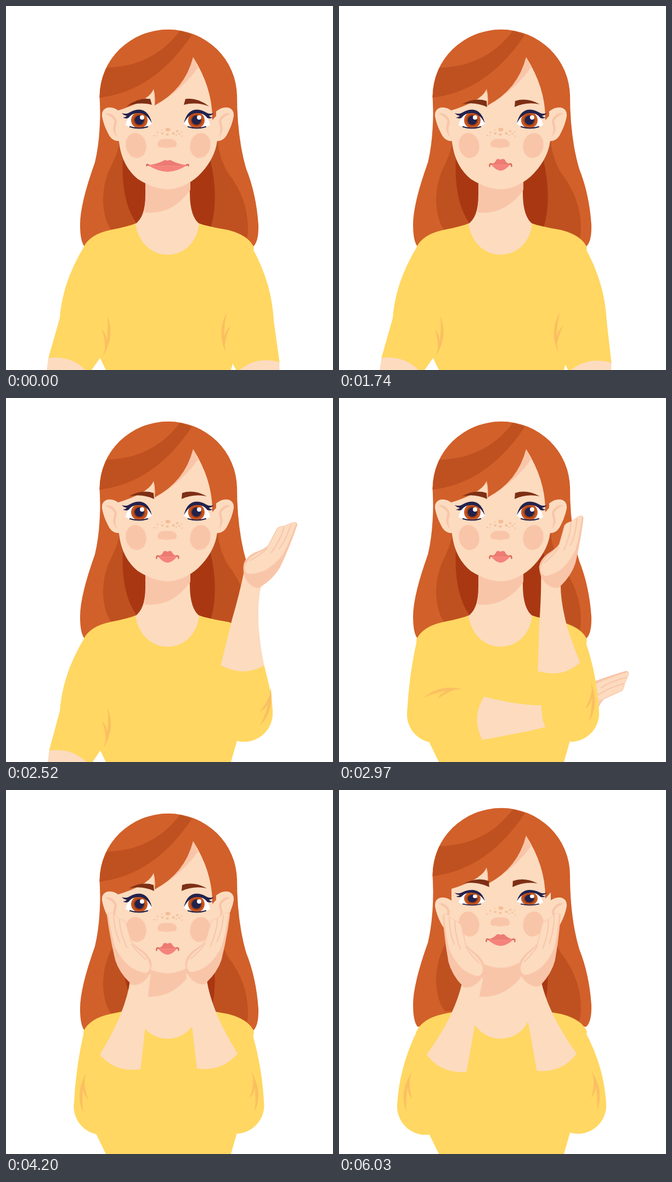
An HTML page that plays this animation: 596 px wide and 663 px high, repeating every 6.84 s.

```html
<!DOCTYPE html>
<html lang="en">
<head>
<meta charset="utf-8">
<title>Hands to face</title>
<style>
  html, body { margin: 0; width: 100%; height: 100%; overflow: hidden; background: #fff; }
  svg { display: block; width: 100%; height: 100%; }
  .skin { fill: #fcdbbf; }
  .shade { fill: #f9c5a8; }
  .shirt { fill: #ffd762; }
  .fold { fill: #fbbf62; }
  .hair { fill: #d2602a; }
  .hair2 { fill: #bf5120; }
  .hair3 { fill: #a93812; }
  .brow { fill: #7d2f15; }
  .navy { fill: #23224c; }
  .line { fill: none; stroke: #f9c5a8; stroke-width: 2; stroke-linecap: round; }
  .lash { fill: none; stroke: #23224c; stroke-width: 2.2; stroke-linecap: round; }
</style>
</head>
<body>
<svg viewBox="0 0 596 663">
  <defs>
    <g id="ear">
      <path class="skin" d="M207 192Q196 183 185 185Q174 188 175 201Q178 217 186 232Q193 247 207 246Z"/>
      <path class="shade" d="M181 196Q190 193 197 201Q205 209 200 219Q198 230 203 240Q193 229 196 217Q200 209 194 204Q189 199 181 196Z"/>
    </g>
    <g id="brow"><path class="brow" d="M224 179Q248 166 269 173L270 184Q248 174 224 179Z"/></g>
    <g id="eye">
      <path fill="#fff" d="M218 217Q221 196 243 193Q261 195 267 214Q257 221 242 222Q227 222 218 217Z"/>
      <circle cx="243" cy="208" r="15" fill="#c9571f"/>
      <circle cx="243" cy="208" r="11" fill="#a54217"/>
      <circle class="navy" cx="243" cy="208" r="8.5"/>
      <path class="navy" d="M211 195Q219 198 225 194Q235 188 246 189Q261 192 266 214Q257 196 243 195Q230 194 223 204Q218 206 213 203Q218 203 220 200Q214 199 211 195Z"/>
      <path class="lash" d="M226 220Q242 225 258 220"/>
    </g>
    <g id="innerhair">
      <path class="hair2" d="M207 245Q204 268 190 295Q177 322 177 355Q178 390 193 410L250 410V290Z"/>
      <path class="hair3" d="M213 278Q209 355 238 396L262 396V300Z"/>
    </g>
    <g id="hand">
      <path class="shade" d="M73 235Q73 228 82 230L97 236Q105 236 110 240L127 271Q132 277 152 284Q168 292 172 304Q174 318 171 327Q164 344 150 348Q144 350 141 346Q118 332 106 312Q88 276 73 235Z"/>
      <path class="skin" d="M75 232Q77 229 83 231L97 237Q105 237 109 241L126 272Q133 280 150 287Q166 296 170 308Q172 318 165 322Q150 324 132 316Q112 304 100 288Q86 262 75 232Z"/>
      <path class="line" d="M97 238Q104 262 121 284M85 234Q94 262 107 278M129 277Q142 289 160 298"/>
    </g>
    <g id="lower">
      <path class="shirt" d="M138 489L126 545Q124 560 124 576A52 52 0 0 0 228 576L217 487Z"/>
      <path class="skin" d="M138 490Q147 440 147 405Q147 370 141 344L172 320Q181 360 195 405L217 488Q176 511 138 490Z"/>
      <path class="fold" d="M127 530Q120 572 148 600Q131 570 127 530ZM128 542Q130 567 148 574Q136 562 128 542Z"/>
    </g>
  </defs>

  <g id="back">
    <path class="hair" d="M171 160Q174 235 162 285Q135 360 135 398Q135 428 143 438H451Q461 428 460 398Q456 342 438 297Q421 240 421 160Z"/>
    <use href="#innerhair"/>
    <path class="hair2" d="M386 245Q388 275 404 303Q441 350 441 405Q441 420 437 430L340 410V290Z"/>
    <path class="hair3" d="M372 278Q389 350 373 404L330 396V300Z"/>
  </g>

  <path class="skin" d="M254 290V345Q254 386 234 398L244 460H345L354 398Q335 385 335 340V290Z"/>
  <path class="shade" d="M254 300H336V335Q302 382 252 376Q255 360 254 340Z"/>

  <g id="head">
    <path class="skin" d="M205 90V235Q207 288 240 315Q270 334 296 334Q325 332 350 310Q386 275 386 232V90Z"/>
    <path class="shade" d="M341 93L350 112Q322 152 271 182L268 150L330 100Z"/>
    <path class="hair" d="M170.500 165A125 122 0 0 1 421 165V192H390L376 208Q377 150 341 93Q326 152 271 181Q273 164 269 151Q262 172 205 190L204 196H172Z"/>
    <path class="hair2" d="M183 112Q267 111 317 45L339 52Q271 155 170.500 167Q171 138 183 112Z"/>
    <ellipse class="shade" cx="237" cy="254" rx="18.500" ry="23" transform="rotate(-12 237 254)"/>
    <ellipse class="shade" cx="354" cy="254" rx="18.500" ry="23" transform="rotate(12 354 254)"/>
    <path class="shade" d="M276 251Q278 241 294 242Q310 241 311 251Q311 259 302 257Q294 260 285 257Q276 259 276 251Z"/>
    <g id="freckles" fill="#f5bd95"></g>
    <use id="browL" href="#brow"/>
    <g transform="matrix(-1 0 0 1 590 0)"><use id="browR" href="#brow"/></g>
    <g id="eyes">
      <use href="#eye"/>
      <use href="#eye" transform="matrix(-1 0 0 1 590 0)"/>
      <circle cx="248" cy="203" r="4" fill="#fff"/>
      <circle cx="352" cy="203" r="4" fill="#fff"/>
    </g>
    <g id="mouth">
      <path id="lowLip" fill="#f5837b"/>
      <path id="upLip" fill="#ed7b73"/>
      <path id="corners" fill="none" stroke="#df6656" stroke-width="2.500" stroke-linecap="round"/>
    </g>
  </g>
  <g id="ears">
    <use href="#ear"/>
    <use href="#ear" transform="matrix(-1 0 0 1 590 0)"/>
  </g>

  <path class="shirt" d="M236 396Q225 401 190 408Q152 416 141 440L165 628L182 663H410L420 628L452 440Q443 418 405 408Q365 401 352 396C344 472 246 472 236 396Z"/>
  <g id="armL">
    <path class="shirt upper"/>
    <g class="fore"><use href="#lower"/><use class="palm" href="#hand"/></g>
  </g>
  <g id="armR" transform="matrix(-1 0 0 1 590 0)">
    <path class="shirt upper"/>
    <g class="fore"><use href="#lower"/><use class="palm" href="#hand"/></g>
  </g>
</svg>
<script>
const LOOP = 6840, STEP = 30;
const $ = id => document.getElementById(id);
const set = (el, name, value) => el.setAttribute(name, value);
const move = (el, value) => set(el, 'transform', value);

// Smooth monotone curve through [time, value] keys; flat at turning points.
function track(...keys) {
  const slope = i => (keys[i + 1][1] - keys[i][1]) / (keys[i + 1][0] - keys[i][0]);
  const tangents = keys.map((_, i) => {
    if (!i || i === keys.length - 1) return 0;
    const a = slope(i - 1), b = slope(i);
    return a * b > 0 ? 2 * a * b / (a + b) : 0;
  });
  return t => {
    if (t <= keys[0][0]) return keys[0][1];
    const i = keys.findIndex(k => k[0] > t) - 1;
    if (i < 0) return keys[keys.length - 1][1];
    const [t0, v0] = keys[i], [t1, v1] = keys[i + 1];
    const d = t1 - t0, u = (t - t0) / d, w = 1 - u;
    return v0 * (1 + 2 * u) * w * w + v1 * u * u * (3 - 2 * u)
      + d * u * w * (tangents[i] * w - tangents[i + 1] * u);
  };
}

const nod = track([0, 0], [705, .58], [1395, 0], [4720, 0], [5430, 1]);
const smile = track([1390, 1], [1730, 0]);
const glad = track([4720, 0], [5430, 1]);
const lids = track([5890, 1], [6030, .82]);

const arms = [
  { el: $('armL'), y: 576,
    x: track([2485, 149.5], [2970, 176], [4140, 176], [4800, 158]),
    turn: track([2485, 203], [3440, -10], [3630, -.5], [4100, 20], [4900, 25]),
    bend: track([3630, 0], [4100, -8], [4500, -9]) },
  { el: $('armR'), y: 574,
    x: track([1700, 154], [2100, 158], [2510, 156], [2970, 168], [3630, 172], [4140, 172], [4800, 155]),
    turn: track([1700, 195], [2510, 1], [2640, 1.5], [2970, 13], [3480, 16.5], [3630, 18.7], [4100, 21], [4900, 25]),
    bend: track([2970, 0], [3630, -8], [4100, -9]) }
];
for (const arm of arms) {
  for (const part of ['upper', 'fore', 'palm']) arm[part] = arm.el.querySelector('.' + part);
}

const spots = [[270, 236, 1.5], [276, 230, 1.7], [275, 236, 1], [285, 232, 2.4], [284, 226, 1.2], [295, 225, 4.5],
  [294, 234, 2.6], [305, 232, 2.6], [312, 228, 2.2], [310, 235, 1.3], [316, 233, 1.7], [321, 237, 1.3], [320, 229, 1.4]];
$('freckles').innerHTML = spots.map(([x, y, r]) =>
  `<ellipse cx="${x}" cy="${y}" rx="${r}" ry="${r * .75}"/>`).join('');

function drawArm({ x, y, turn, bend, upper, fore, palm }, t) {
  const ex = x(t);
  set(upper, 'd', `M190 410Q150 420 143 437Q${ex - 49} ${y - 70} ${ex - 52} ${y}` +
    `A52 52 0 0 0 ${ex + 52} ${y}L230 430Z`);
  move(fore, `translate(${ex - 176} ${y - 576}) rotate(${turn(t)} 176 576)`);
  move(palm, `rotate(${bend(t)} 157 338)`);
}

function drawMouth(s, g) {
  const w = 18 + 18 * s + 6 * g, k = w * .45;
  move($('mouth'), `translate(294.500 ${288 + 2 * s - 6 * g})`);
  set($('upLip'), 'd', `M${-w} 0Q${-k} -3 -8 -8Q-4 -11 0 -8Q4 -11 8 -8Q${k} -3 ${w} 0Q0 3 ${-w} 0Z`);
  set($('lowLip'), 'd', `M${-w} 0Q0 3 ${w} 0Q${k} 12 0 12Q${-k} 12 ${-w} 0Z`);
  const corner = n => `M${n * (w + 2)} ${4 - 3 * s}Q${n * (w + 2.5)} ${-2 - s} ${n * (w - 2)} 0`;
  set($('corners'), 'd', corner(-1) + corner(1));
}

function draw(t) {
  const n = nod(t), s = smile(t), g = glad(t);
  move($('back'), `translate(0 ${-7 * n})`);
  move($('head'), `translate(0 ${-10 * n})`);
  move($('ears'), `translate(0 ${11 * n})`);
  const brow = `translate(${4 * g - 5 * s} ${2 * g}) rotate(${2 * g - 10 * s} 247 177)`;
  move($('browL'), brow);
  move($('browR'), brow);
  move($('eyes'), `translate(0 207) scale(1 ${lids(t)}) translate(0 -207)`);
  drawMouth(s, g);
  arms.forEach(arm => drawArm(arm, t));
}

const start = performance.now();
function tick() {
  const t = (performance.now() - start) % LOOP;
  draw(Math.floor(t / STEP) * STEP);
  requestAnimationFrame(tick);
}
tick();
</script>
</body>
</html>
```
